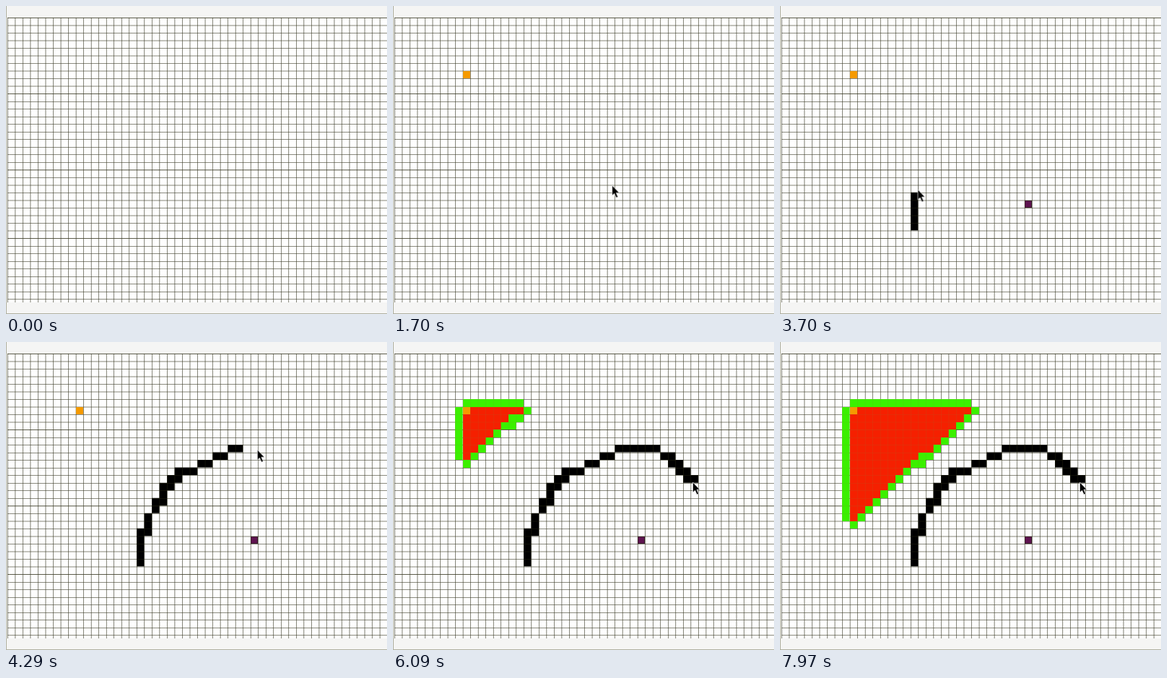
Animation, 528 px wide and 426 px high, one loop 8 s. Source, as an HTML page without scripts:

```html
<!DOCTYPE html>
<html lang="en">
<head>
<meta charset="utf-8">
<title>Flood fill on a grid</title>
<style>
:root { --u: 10.526px; --loop: 8s; --pop: 19.4ms; --green: #3bf000; --red: #f52000; }
html, body { margin: 0; width: 100%; height: 100%; overflow: hidden; }
body { position: relative; background: #f5f5f4; }
body *, .row::before { position: absolute; box-sizing: border-box; }
.frame { inset: 0; border: solid #b0b0a0; border-width: 0 0 1px 1px; }
.paper { left: 2px; top: 16px; width: 526px; height: 394px; background: #fefefe; }
.grid { left: 0; top: 0; width: 528px; height: 426px; fill: none; stroke: #1c1c16; stroke-dasharray: .526 10; }
.over { stroke: #84843c; opacity: .25; }

.cell {
  left: calc(2px + var(--c) * var(--u)); top: calc(16px + var(--r) * var(--u));
  width: var(--u); height: var(--u); visibility: hidden;
}
.seed { --c: 9; --r: 7; background: #f59a00; animation: seed var(--loop) step-end infinite; }
.mark { --c: 32; --r: 24; background: #5e1450; border: 1px solid #3a1a2c; animation: mark var(--loop) step-end infinite; }
@keyframes seed { 12.5% { visibility: visible } }
@keyframes mark { 26% { visibility: visible } }

.arc {
  left: calc(2px + 17 * var(--u)); top: calc(16px + 12 * var(--u));
  width: calc(23 * var(--u)); height: calc(16 * var(--u));
  animation: arc var(--loop) infinite;
}
@keyframes arc {
  0%, 42.3% { clip-path: inset(calc(16 * var(--u)) calc(22 * var(--u)) 0 0); animation-timing-function: steps(5) }
  46% { clip-path: inset(calc(11 * var(--u)) calc(22 * var(--u)) 0 0); animation-timing-function: step-end }
  46.01% { clip-path: inset(0 calc(22 * var(--u)) 0 0); animation-timing-function: steps(13) }
  53.2%, 53.9% { clip-path: inset(0 calc(9 * var(--u)) 0 0); animation-timing-function: steps(9) }
  58%, 100% { clip-path: inset(0 0 0 0) }
}

/* Each row grows with the fill front n; row k trails by k pops. */
.fill { inset: 0; visibility: hidden; animation: fill var(--loop) step-end infinite; }
@keyframes fill { 69% { visibility: visible } }
.row {
  --n: 0;
  left: calc(2px + 8 * var(--u)); top: calc(16px + (7 + var(--k)) * var(--u));
  width: calc(19 * var(--u)); height: var(--u);
  background: linear-gradient(var(--green) 0 0) var(--u) 0 / max(0px, (var(--n) + 1 - var(--k)) * var(--u)) 100% no-repeat;
  animation: front var(--loop) step-end infinite;
  animation-delay: calc(max(0, var(--k) - 1) * var(--pop) - 8004ms);
}
.row::before {
  --n: 0;
  --w: calc((var(--n) - var(--k)) * var(--u));
  content: ""; inset: 0;
  background:
    linear-gradient(var(--red) 0 0) var(--u) 0 / max(0px, var(--w)) 100% no-repeat,
    linear-gradient(var(--green) 0 0) 0 0 / clamp(0px, var(--w), var(--u)) 100% no-repeat;
  animation: front var(--loop) step-end infinite;
  animation-delay: calc(var(--k) * var(--pop) - 7985ms);
}
.top { --k: 1; top: calc(16px + 6 * var(--u)); }
.top::before { display: none; }
@keyframes front {
  0% { --n: 0 }
  69.45% { --n: 1 }
  69.69% { --n: 2 }
  70.14% { --n: 3 }
  70.83% { --n: 4 }
  71.74% { --n: 5 }
  72.89% { --n: 6 }
  74.28% { --n: 7 }
  75.89% { --n: 8 }
  77.76% { --n: 9 }
  79.88% { --n: 10 }
  82.24% { --n: 11 }
  84.88% { --n: 12 }
  87.76% { --n: 13 }
  90.94% { --n: 14 }
  94.38% { --n: 15 }
  98.11%, 100% { --n: 16 }
}

.cursor { left: -1px; top: 0; width: 12px; height: 18px; overflow: visible; animation: move var(--loop) linear infinite, show var(--loop) step-end infinite; }
@keyframes show { 0% { visibility: hidden } 2%, 100% { visibility: visible } }
@keyframes move {
  0%, 2% { transform: translate(300px, 2px) }
  10.5%, 14% { transform: translate(102px, 96px) }
  21.25% { transform: translate(304px, 248px) }
  25%, 30.5% { transform: translate(344px, 274px) }
  36.25% { transform: translate(182px, 265px) }
  41%, 42.3% { transform: translate(186px, 306px) }
  46% { transform: translate(188px, 260px) }
  49% { transform: translate(228px, 190px) }
  51.5% { transform: translate(290px, 160px) }
  53.6% { transform: translate(348px, 149px) }
  54.6% { transform: translate(370px, 152px) }
  58%, 100% { transform: translate(416px, 194px) }
}
</style>
</head>
<body>
<div class="frame"></div>
<div class="paper"></div>
<!-- Wide dashed strokes: every dash is one grid line. -->
<svg class="grid" viewBox="0 0 528 426">
  <path d="M2.1 213H528" stroke-width="394"/>
  <path d="M265 16.1V410" stroke-width="526"/>
</svg>
<div class="fill">
  <div class="row top"></div>
  <div class="row" style="--k:0"></div>
  <div class="row" style="--k:1"></div>
  <div class="row" style="--k:2"></div>
  <div class="row" style="--k:3"></div>
  <div class="row" style="--k:4"></div>
  <div class="row" style="--k:5"></div>
  <div class="row" style="--k:6"></div>
  <div class="row" style="--k:7"></div>
  <div class="row" style="--k:8"></div>
  <div class="row" style="--k:9"></div>
  <div class="row" style="--k:10"></div>
  <div class="row" style="--k:11"></div>
  <div class="row" style="--k:12"></div>
  <div class="row" style="--k:13"></div>
  <div class="row" style="--k:14"></div>
  <div class="row" style="--k:15"></div>
</div>
<div class="cell seed"></div>
<div class="cell mark"></div>
<svg class="arc" viewBox="0 0 23 16">
  <path d="M0 11h1v5h-1zM1 9h1v3h-1zM2 7h1v2h-1zM3 5h1v3h-1zM4 4h1v2h-1zM5 3h1v2h-1zM6 3h2v1h-2zM8 2h2v1h-2zM10 1h2v1h-2zM12 0h6v1h-6zM18 1h2v1h-2zM19 2h2v1h-2zM20 3h2v1h-2zM21 4h2v1h-2z"/>
</svg>
<svg class="grid over" viewBox="0 0 528 426">
  <path d="M2.1 213H528" stroke-width="394"/>
  <path d="M265 16.1V410" stroke-width="526"/>
</svg>
<svg class="cursor" viewBox="0 0 12 18">
  <path d="M.5 0V14L3.6 11.2 6.2 17 8.6 16 6 10.2H10.3Z" stroke="#fff" stroke-width=".6"/>
</svg>
</body>
</html>
```
